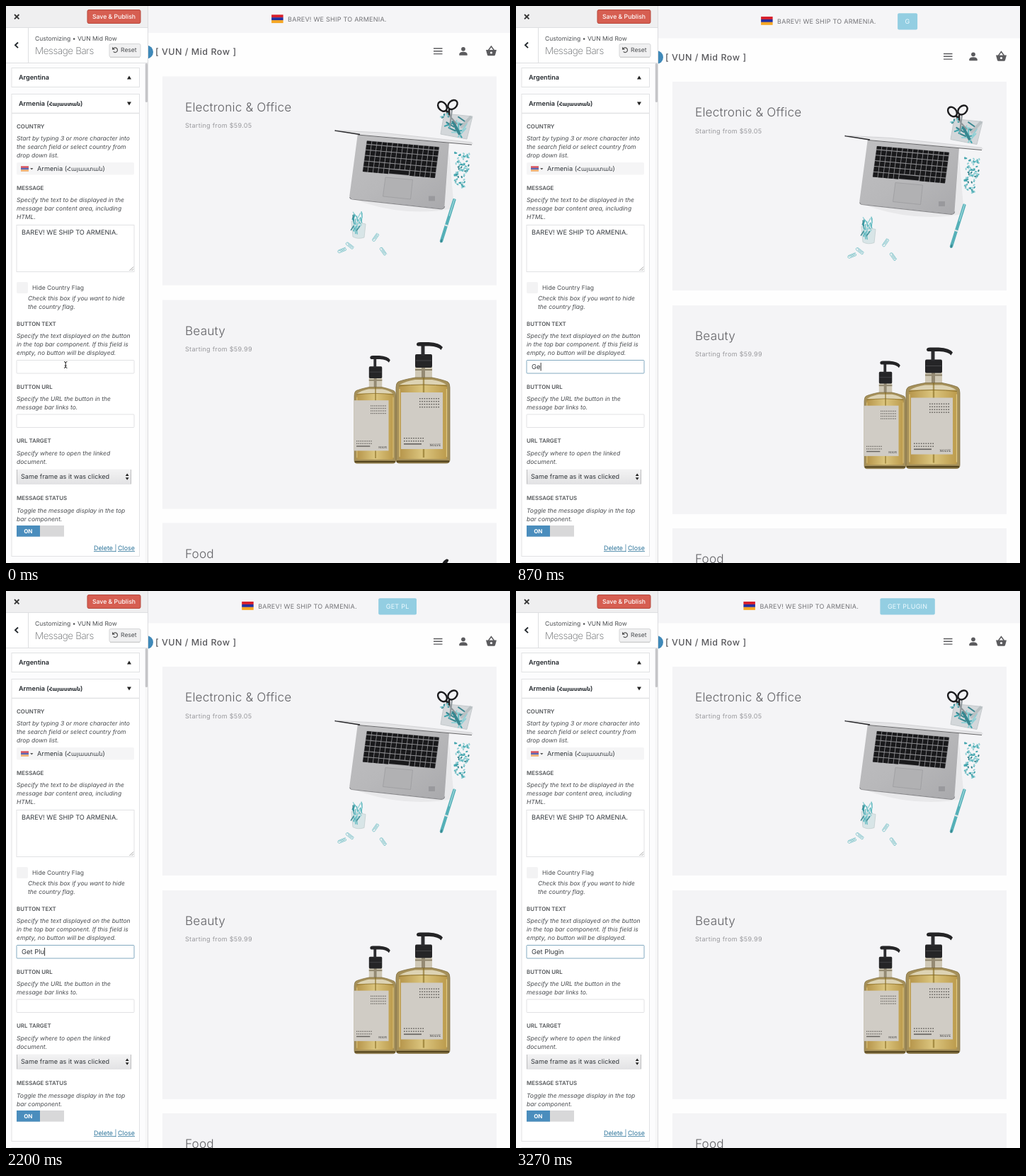
Recreate the animation shown at these times as an HTML page. Size 712 by 787 pixels, loop 3.34 s.

```html
<!DOCTYPE html>
<html lang="en">
<head>
<meta charset="utf-8">
<title>Message bar settings</title>
<style>
  html, body { margin: 0; width: 100%; height: 100%; overflow: hidden; background: #fefefe; }
  svg { display: block; width: 712px; height: 787px; }
  text { font-family: Inter, "Liberation Sans", sans-serif; text-rendering: geometricPrecision; white-space: pre; }
  .label { font-size: 7.9px; font-weight: 600; fill: #54575a; }
  .hint { font-size: 8.54px; font-style: italic; fill: #484b4f; }
  .value { font-size: 9.2px; fill: #32373c; }
  .small { font-size: 8.55px; fill: #4c4f52; }
  .title { font-size: 9.1px; font-weight: 600; fill: #23282d; }
  .arm { font-family: "DejaVu Sans", sans-serif; }
  .link { font-size: 8.9px; fill: #2a7299; }
  .bar { font-size: 9px; letter-spacing: .25px; fill: #727276; }
  .brand { font-size: 12.5px; font-weight: 450; letter-spacing: .5px; fill: #58585c; }
  .head { font-size: 17.2px; font-weight: 300; letter-spacing: .17px; fill: #626266; }
  .price { font-size: 9px; letter-spacing: .32px; fill: #98989c; }
  .box { fill: #fff; stroke: #e1e2e4; }
</style>
</head>
<body>
<svg id="stage" viewBox="0 0 712 787" xmlns="http://www.w3.org/2000/svg"></svg>
<script>
const LOOP = 3340, CENTRE = 456.6, SHIFT = 7.5;
const CLICK = 330, BLINK_OFF = 3200;
const MESSAGE_W = 163, BUTTON_X = 193, PAD = 10.5;

// [time, text] pairs; the preview follows the typing with a delay
const typed = [[0, ""], [530, "G"], [800, "Ge"], [930, "Get"], [1130, "Get "], [1670, "Get P"],
  [1870, "Get Pl"], [2130, "Get Plu"], [2330, "Get Plug"], [2470, "Get Plugi"], [2600, "Get Plugin"]];
const preview = [[0, ""], [870, "G"], [1070, "GET"], [1930, "GET P"], [2130, "GET PL"],
  [2400, "GET PLU"], [2530, "GET PLUG"], [2730, "GET PLUGIN"]];

let seed = 11;
const rnd = () => (seed = (seed * 16807) % 2147483647) / 2147483647;
const times = (n, fn) => Array.from({ length: n }, (_, i) => fn(i)).join("");
const text = (cls, x, y, s, extra = "") => `<text class="${cls}" x="${x}" y="${y}" ${extra}>${s}</text>`;
const rect = (x, y, w, h, fill, extra = "") => `<rect x="${x}" y="${y}" width="${w}" height="${h}" fill="${fill}" ${extra}/>`;
const path = (d, fill, extra = "") => `<path d="${d}" fill="${fill}" ${extra}/>`;
const line = (d, stroke, w = 1, extra = "") => path(d, "none", `stroke="${stroke}" stroke-width="${w}" ${extra}`);
const box = (x, y, w, h, extra = "") => `<rect class="box" x="${x}" y="${y}" width="${w}" height="${h}" ${extra}/>`;
const hints = (x, y, ...rows) => rows.map((s, i) => text("hint", x, y + i * 12, s)).join("");
const flag = (x, y, w, h, colors) => colors.map((c, i) => rect(x, y + i * h / 3, w, h / 3 + .1, c)).join("");
const armenia = size => `Armenia (<tspan class="arm" font-size="${size}">Հայաստան</tspan>)`;

function sidebar() {
  return rect(0, 0, 200.5, 787, "#fcfcfd")
    + rect(0, 0, 200.5, 30, "#efeff0") + rect(0, 30, 200.5, 50, "#fff")
    + line("M0 30.5H200M31.5 31V80M0 80.5H200", "#dedfe1")
    + line("M12 12l6.4 6.4M18.4 12L12 18.4", "#333", 1.8)
    + rect(115, 5.5, 75, 19, "#d65e51", 'rx="2" stroke="#b6483d"')
    + text("small", 152.5, 18.3, "Save &amp; Publish", 'text-anchor="middle" style="fill:#fff;font-size:8.7px;font-weight:500"')
    + line("M17 51.5L13 55.3L17 59.1", "#23282d", 1.9)
    + text("small", 41, 49, "Customizing • VUN Mid Row")
    + text("", 41, 68, "Message Bars", 'font-size="13.5" font-weight="200" letter-spacing="-.4" fill="#5c5f62"')
    + rect(146, 53.5, 44, 18.5, "#f0f0f1", 'rx="2" stroke="#d5d6d8"') + line("M147 72.5H189", "#ccc")
    + line("M151.6 60.2A3.3 3.3 0 1 1 151.7 64.4", "#555", 1.2) + path("M150 57.8V61.8H154Z", "#555")
    + text("small", 162, 65.3, "Reset")
    + box(8, 87.5, 180.5, 27) + text("title", 18, 104, "Argentina") + path("M171 103.6H177L174 98.6Z", "#222")
    + box(8, 124.5, 180.5, 653) + line("M8 151.5H188", "#e1e2e4", 1.4)
    + text("title", 18, 140.5, armenia(7.4)) + path("M171 135.6H177L174 140.6Z", "#222")
    + box(8, 786.5, 180.5, 20)
    + text("label", 15, 172.7, "COUNTRY")
    + hints(15, 190, "Start by typing 3 or more character into", "the search field or select country from", "drop down list.")
    + rect(15, 221, 166, 17.5, "#f5f5f6", 'rx="2"')
    + flag(21, 226.3, 11, 7.4, ["#d9505b", "#5b68b4", "#f0b070"]) + path("M34.2 229H38.4L36.3 231.4Z", "#555")
    + text("value", 44, 233.2, armenia(8.2))
    + text("label", 15, 260, "MESSAGE")
    + hints(15, 277.3, "Specify the text to be displayed in the", "message bar content area, including", "HTML.")
    + box(15, 309.5, 166, 66) + text("value", 22, 323.2, "BAREV! WE SHIP TO ARMENIA.")
    + line("M174.5 374L180 368.5M177.5 374L180 371.5", "#888", .8)
    + rect(15, 390, 16, 16, "#f3f3f4", 'rx="2"') + text("small", 37, 401.2, "Hide Country Flag")
    + hints(31, 416.3, "Check this box if you want to hide", "the country flag.")
    + text("label", 15, 452, "BUTTON TEXT")
    + hints(15, 469.3, "Specify the text displayed on the button", "in the top bar component. If this field is", "empty, no button will be displayed.")
    + `<rect id="field" x="15" y="500.5" width="166" height="18.5" rx="1" fill="#fff"/>`
    + text("value", 22, 513.2, "", 'id="entry" style="font-size:9.4px"')
    + rect(22, 504, .9, 11.5, "#222", 'id="caret"')
    + line("M82 502.5Q84.2 502.5 84.2 504.5V509.5Q84.2 511.5 82 511.5M86.4 502.5Q84.2 502.5 84.2 504.5M84.2 509.5Q84.2 511.5 86.4 511.5M82.8 508.2H85.6", "#222", 1, 'id="pointer"')
    + text("label", 15, 540.5, "BUTTON URL")
    + hints(15, 557.8, "Specify the URL the button in the", "message bar links to.")
    + box(15, 577, 166, 18.5, 'rx="1"')
    + text("label", 15, 617.2, "URL TARGET")
    + hints(15, 634.5, "Specify where to open the linked", "document.")
    + rect(15, 654.5, 162, 21.5, "url(#select)", 'rx="2"') + line("M15.5 655V675.5M176.5 655V675.5", "#bcbcbe")
    + text("value", 21, 668.3, "Same frame as it was clicked", 'style="font-size:9.1px"')
    + path("M168.8 664H173.6L171.2 660.4ZM168.8 666.2H173.6L171.2 669.8Z", "#222")
    + text("label", 15, 698.2, "MESSAGE STATUS")
    + hints(15, 715.7, "Toggle the message display in the top", "bar component.")
    + rect(15, 734, 67, 15.7, "#d8d8d9") + rect(15, 734, 33, 15.7, "#4a8dbd")
    + text("", 31.3, 744.9, "ON", 'text-anchor="middle" font-size="8" font-weight="700" fill="#fff"')
    + text("link", 124, 769, "Delete |") + text("link", 158, 769, "Close")
    + line("M124 770.6H155.5M158 770.6H182", "#2a7299", .8)
    + rect(196.6, 81, 3.6, 706, "#f6f6f7") + rect(196.8, 81, 3.2, 55, "#c5c5c8", 'rx="1.5"')
    + line("M200.5 0V787", "#dcdcdf");
}

const clip = (x, y, a) => `<g transform="translate(${x} ${y}) rotate(${a})">`
  + line("M-5 -1.2H5Q7 0 5 1.6H-5Q-8 0 -5 -2.4H6M-3 .2H4", "#6cbcc3", .7) + "</g>";
const stick = (x, y, a, len, w, c) => rect(-len / 2, -w / 2, len, w, c, `rx="1" transform="translate(${x} ${y}) rotate(${a})"`);

function keyboard() {
  const rows = times(6, r => times(14, c => {
    if (r === 5 && c > 4 && c < 9) return c === 5 ? rect(36.3, 85.2, 27, 13, "#19191b") : "";
    return rect(c * 7.12 + .5, r ? 12 + (r - 1) * 17.8 + 1.4 : 1, 6.3, r ? 15.4 : 9.6, "#19191b");
  }));
  return `<g transform="matrix(1.03 .09 -.06 .44 509.5 190)">${rect(0, 0, 100, 100, "#8d8d90", 'rx="2"')}${rows}</g>`;
}

function desk() {
  const teal = ["#3fa3ac", "#62bac1", "#37868f", "#93d0d5"];
  const pick = () => teal[Math.floor(rnd() * 4)];
  return path("M486 271L619 288L626 205L633 286Q560 300 486 271Z", "#000", 'opacity=".05"')
    + path("M497 180L626 193L619.5 283Q619 287 615 286.5L489 272.5Q485 272 485.3 268Z", "url(#metal)")
    + line("M485.6 270Q486 272.6 489 273L615 286.8Q619 287 619.6 283", "#8a8a8d", 1.2)
    + path("M464.5 175.5L530 179L659 192.8Q661 195.5 657 196.3L497 182.5Z", "#e4e4e6")
    + line("M497 182L658 196", "#58585b", .9) + line("M464.5 176L500 181.5", "#29292c", 1.3)
    + line("M466 175.6L530 179L658 192.7", "#c7c7ca", .7)
    + keyboard()
    + path("M536 242L574.5 245.5L571.5 273L532.5 269Z", "#b1b1b3", 'stroke="#9a9a9d" stroke-width=".7"')
    + rect(597, 268.5, 9, 7, "#8d8d90", 'opacity=".6"')
    + path("M619 152L659 156L651 188L614 181Z", "#c9ced1", 'opacity=".75" stroke="#b3babd"')
    + times(17, () => stick(625 + rnd() * 24, 160 + rnd() * 20, rnd() * 180, 9 + rnd() * 9, 2, pick()))
    + stick(650, 164, -48, 22, 4, "#b9c0c3") + stick(636, 172, 62, 22, 4, "#37868f")
    + line("M622 150L637 167M630 147L627 170", "#8f969a", 2)
    + `<g fill="none" stroke="#1c1c1e" stroke-width="2.4"><ellipse cx="616.5" cy="142" rx="5.5" ry="7.5" transform="rotate(-40 616.5 142)"/>`
    + `<ellipse cx="631" cy="139.5" rx="5.5" ry="7.5" transform="rotate(48 631 139.5)"/></g>` + line("M621 147L626 152L626 146", "#1c1c1e", 2.6)
    + times(11, () => rect(612 + rnd() * 12, 150 + rnd() * 7, 2, 2, pick()))
    + times(72, () => {
      const y = rnd(), x = 634 + rnd() * (23 - y * 8);
      return stick(x, 207 + y * 50, rnd() * 180, 3.4, 2, pick());
    })
    + stick(624.2, 303, 107.5, 64, 4.4, "#55b0b8") + stick(630, 284.5, 107.5, 26, 1.4, "#9bd6da")
    + stick(622, 310, 107.5, 2, 5, "#e2e6e7") + stick(615, 332, 107.5, 5, 2, "#37868f")
    + path("M488 304L508 308L506 327Q497 330 490 326Z", "#d8e5e7", 'stroke="#c2ced0" stroke-width=".8"')
    + times(26, () => stick(489 + rnd() * 14, 294 + rnd() * 27, 50 + rnd() * 80, 9, 1.4, pick()))
    + clip(475, 345.5, -22) + clip(485.5, 339, 38) + clip(522.5, 327, -55) + clip(532.5, 347, 55);
}

// Drawn in a 76 by 172 space; the label may wrap past the left edge
function bottle(place, labelX, labelW) {
  const dots = (x, y, cols, rows) => times(rows, r => times(cols, c => rect(x + c * 3.3, y + r * 4, 1.6, 1.4, "#5d5a56")));
  const right = labelX + labelW;
  return `<g transform="${place}">`
    + rect(27, 35, 24, 18, "#cfc8b5") + rect(27, 38, 24, 2, "#8b8168") + rect(36, 35, 5, 20, "#948a73")
    + path("M27 50Q10 53 3 56Q0 58 0 64V166Q0 171 5 171H71Q76 171 76 166V64Q76 58 73 56Q66 53 51 50Z", "#a5905a", 'stroke="#7f6d3f" stroke-width=".8"')
    + path("M4 63Q14 56 27 54H51Q64 56 72 63V163Q72 165 69 165H7Q4 165 4 163Z", "url(#oil)")
    + path("M5 60Q14 55 27 53H51Q64 55 71 60Z", "#ddd3b4")
    + line("M4 62Q20 60 38 60T72 62", "#8f7430", 1)
    + line("M39 50V163", "#84691f", 2.4, 'opacity=".6"')
    + line("M1 168.5H75", "#54451f", 2.6) + line("M5 66V162M71.5 66V162", "#f0dc98", 1.3, 'opacity=".7"')
    + rect(27, 17, 24, 19, "#252527", 'rx="2"') + line("M28 26H50", "#47474a", 1)
    + rect(35.5, 4, 5, 15, "#2d2d30")
    + path("M29 3Q29 0 34 0H46Q62 1 66 7L63.5 11Q60 6 47 5.5H34Q29 6 29 3Z", "#242426")
    + rect(labelX, 71, labelW, 80, "#d0ccc5")
    + dots(right - 33, 79, 9, 4)
    + dots(labelX + 4, 135, 9, 2) + rect(labelX + 4, 143, 25, 1.6, "#66635f")
    + `<text x="${right - 3}" y="147" text-anchor="end" font-size="4.6" style="font-family:'Noto Serif',serif" fill="#333">NOLVE</text></g>`;
}

function page() {
  const card = (y, title) => rect(221, y, 472, 295, "#f4f4f6") + text("head", 253, y + 49.3, title);
  return rect(200, 38, 512, 800, "#fefefe")
    + `<circle cx="198.5" cy="65" r="9.5" fill="#3f89b9"/>`
    + text("brand", 211, 69, "[ VUN / Mid Row ]")
    + line("M604 60H616.5M604 63.8H616.5M604 67.6H616.5", "#5b5b5e", 1.4)
    + path("M640.3 69.7V67.8Q641 64.8 646 64.8T651.7 67.8V69.7Z", "#5b5b5e") + `<circle cx="646" cy="60.8" r="2.9" fill="#5b5b5e"/>`
    + path("M678 62H693L691 69.2Q690.7 70.3 689.5 70.3H681.5Q680.3 70.3 680 69.2Z", "#5b5b5e")
    + line("M681.5 62.5L685.5 57L689.5 62.5", "#5b5b5e", 1.5) + `<circle cx="685.5" cy="66" r="1.6" fill="#fefefe"/>`
    + card(99.5, "Electronic &amp; Office") + text("price", 253, 172, "Starting from $59.05") + desk()
    + card(415.5, "Beauty") + text("price", 253, 487.6, "Starting from $59.99")
    + bottle("translate(492 494) scale(.77 .89)", 0, 63) + bottle("translate(551 475)", 7, 59)
    + card(730.5, "Food") + path("M616 789Q617 784 622 781.5Q626 781 625 784L622 789Z", "#1d1d1f");
}

const stage = document.getElementById("stage");
const grad = (id, dir, a, b, c) => `<linearGradient id="${id}" ${dir}><stop stop-color="${a}"/><stop offset=".5" stop-color="${b}"/><stop offset="1" stop-color="${c}"/></linearGradient>`;
stage.innerHTML = "<defs>"
  + grad("select", 'x2="0" y2="1"', "#f3f3f4", "#ebebec", "#e2e2e4")
  + grad("metal", 'x2="1" y2="1"', "#bfbfc1", "#b8b8ba", "#a9a9ac")
  + grad("oil", 'x2="1" y2="0"', "#b5944a", "#dcc67f", "#bb9a4c") + "</defs>"
  + `<g id="page">${page()}</g>`
  + `<rect id="strip" x="200" width="512" fill="#f5f5f7"/>`
  + `<g id="notice">${flag(0, 12.3, 16.5, 11.7, ["#d8202c", "#2330a0", "#f5a623"])}${text("bar", 23, 22, "BAREV! WE SHIP TO ARMENIA.")}`
  + `<g id="button">${rect(BUTTON_X, 7.6, 40, 23.2, "#93cee2", 'id="plate" rx="2"')}${text("bar", BUTTON_X + PAD, 22.3, "", 'id="caption" style="fill:#eefaff"')}</g></g>`
  + sidebar();

const $ = id => document.getElementById(id);
const show = (id, on) => $(id).setAttribute("visibility", on ? "visible" : "hidden");
const at = (steps, t) => steps.filter(s => s[0] <= t).pop()[1];

function render(t) {
  const entry = at(typed, t), caption = at(preview, t), focus = t >= CLICK;
  $("entry").textContent = entry;
  $("caret").setAttribute("x", 22.2 + (entry ? $("entry").getComputedTextLength() : 0));
  $("field").setAttribute("stroke", focus ? "#82a9c0" : "#e1e2e4");
  show("caret", focus && t < BLINK_OFF);
  show("pointer", t < 530);

  const shift = caption ? SHIFT : 0;
  $("page").setAttribute("transform", `translate(0 ${shift})`);
  $("strip").setAttribute("height", 38 + shift);
  $("caption").textContent = caption;
  const plate = caption ? $("caption").getComputedTextLength() + 2 * PAD : 0;
  $("plate").setAttribute("width", plate);
  show("button", caption);
  const width = caption ? BUTTON_X + plate : MESSAGE_W;
  $("notice").setAttribute("transform", `translate(${CENTRE - width / 2} ${caption ? 2.7 : 0})`);
}

function tick() {
  render(performance.now() % LOOP);
  requestAnimationFrame(tick);
}
tick();
</script>
</body>
</html>
```
